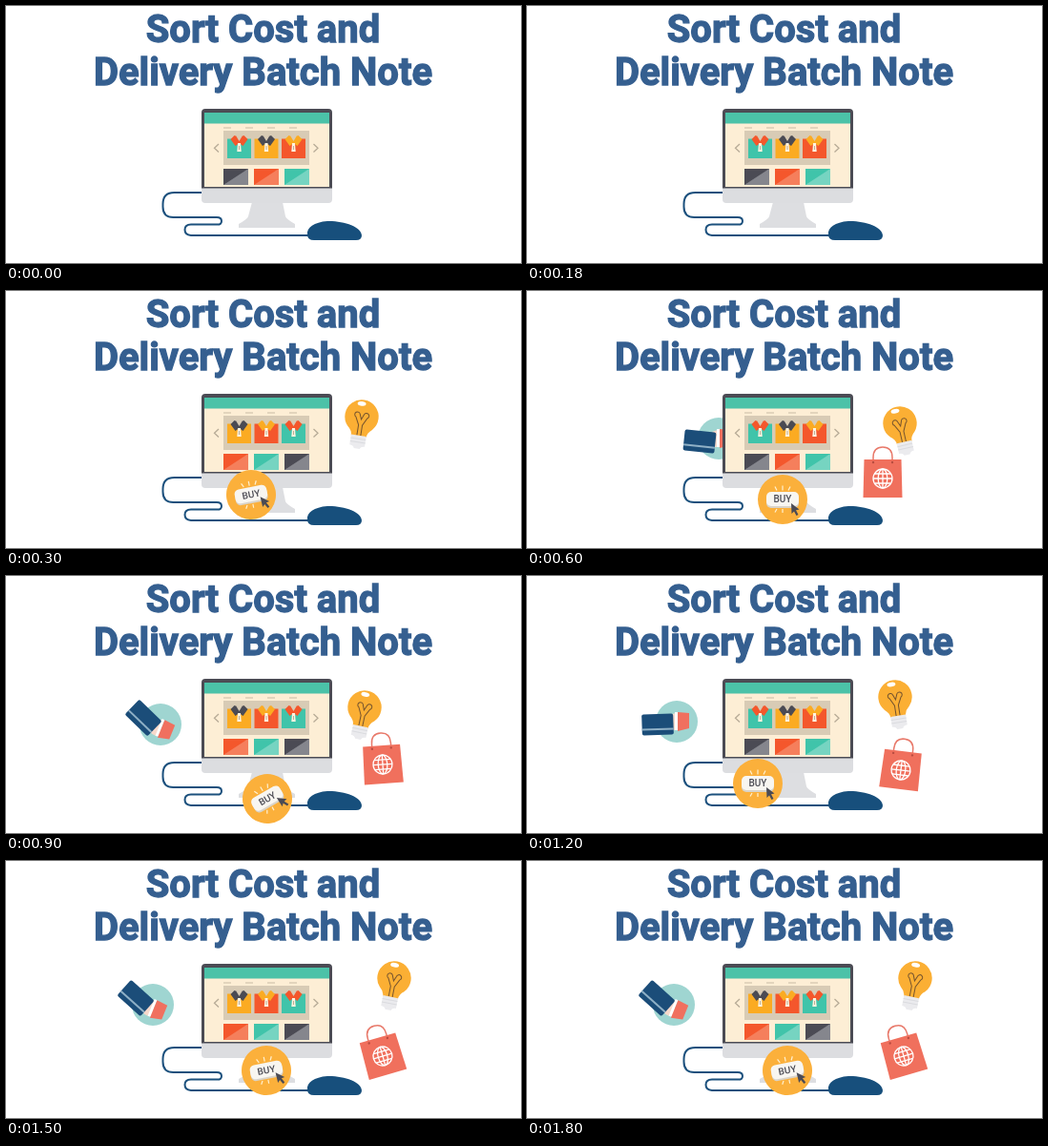
These frames come from a looping animation (540 px wide and 270 px high, 2000 ms). An HTML page:

```html
<!DOCTYPE html>
<html lang="en">
<head>
<meta charset="utf-8">
<title>Order animation</title>
<style>
html, body { margin: 0; width: 100%; height: 100%; overflow: hidden; background: #fff; }
svg { display: block; width: 540px; height: 270px; }
text { font-family: Roboto, Arial, sans-serif; text-anchor: middle; }
.title { font-weight: 700; font-size: 40px; fill: #355f90; stroke: #355f90; stroke-width: 1.3px; }
</style>
</head>
<body>
<svg viewBox="0 0 540 270">
  <text class="title" x="269.5" y="38">Sort Cost and</text>
  <text class="title" x="269.5" y="82.5">Delivery Batch Note</text>
  <g id="card"></g>
  <path d="M206 196H176.500Q164.500 196 164.500 208V211Q164.500 222 175.500 222H221Q226 222 226 226T221 229.500H194Q187.500 229.500 187.500 235T194 241H320"
    fill="none" stroke="#1b507d" stroke-width="2"/>
  <path d="M316 240C315 233 323 227 337 226C354 225.500 373 232 373 241Q373 246 367 246H323Q316 246 316 240Z" fill="#174f7c"/>
  <path d="M258 206H290L293 221Q294 224 303 229V233H244V229Q253 224 254 221Z" fill="#dddee1"/>
  <path d="M205 192V112Q205 108 209 108H338Q342 108 342 112V192Z" fill="#4b4b54"/>
  <path d="M205 191.500H342V203Q342 207 338 207H209Q205 207 205 203Z" fill="#dcdde0"/>
  <path d="M208 112H339V124H208Z" fill="#4bc2a8"/>
  <path d="M208 123.500H339V190H208Z" fill="#fdeed5"/>
  <path d="M228 128h8m15 0h8m15 0h8m15 0h8" stroke="#c9bda6" stroke-width="1.200"/>
  <path d="M228 131H318V167H228Z" fill="#d8cbb5"/>
  <path d="M223 145l-4.500 4.200 4.500 4.200M322.500 145l4.500 4.200-4.500 4.200" fill="none" stroke="#b7ab97" stroke-width="1.300"/>
  <g id="shop"></g>
  <g id="bag"></g>
  <g id="bulb"></g>
  <g id="buy"></g>
</svg>
<script>
const teal = '#40c4aa', red = '#f4572c', yellow = '#fbab22', dark = '#4b4b54';

// One [x, y, angle] per step; a missing entry hides the part.
const poses = {
  card: [, , [201, 155, 6], [162, 156, 44], [157, 153, -2], [154, 151, 42]],
  bag: [, , [373, 197, 0], [395, 198, -4], [392, 204, 7], [395, 205, -16]],
  bulb: [, [373, 132, 9], [391, 139, -13], [376, 138, 12], [386, 127, -9], [407, 123, 11]],
  buy: [, [257, 214, -11], [268, 219, 0], [274, 234, -30], [242, 218, 0], [273, 220, -11]]
};

const shape = (d, fill) => `<path d="${d}" fill="${fill}"/>`;
const line = (d, color, width = 1) =>
  `<path d="${d}" fill="none" stroke="${color}" stroke-width="${width}"/>`;
const disc = (r, fill) => `<circle r="${r}" fill="${fill}"/>`;
const place = (x, y, angle, body) =>
  `<g transform="translate(${x} ${y}) rotate(${angle})">${body}</g>`;

const draw = {
  card(x, y, angle) {
    const tilted = angle > 30;
    const hand = shape('M-8 -3Q-3 -9 3 -9L5 8Q-3 11 -8 5Z', '#f7d9cb')
      + shape('M1 -10H4V9H1Z', '#fff') + shape('M4 -10L16 -9V7L4 10Z', '#f0705f');
    const card = '<rect x="-16.500" y="-11" width="33" height="22" rx="2" fill="#1b4d79"/>'
      + shape('M-16.500 4H16.500V6H-16.500Z', '#8fb0c6');
    return place(x, y, 0, disc(22, '#9fd5d1')
      + place(-3, tilted ? 3 : 0, tilted ? 22 : 0, hand)
      + place(tilted ? -18 : -20, tilted ? -7 : 3, angle, card));
  },
  bag(x, y, angle) {
    return place(x, y, angle,
      line('M-10 -17V-22Q-10 -33 0 -33T10 -22V-17', '#e8796a', 1.5)
      + shape('M-19.500 -20H19.500L20.500 20H-20.500Z', '#f0705d')
      + '<g fill="#b84c40"><circle cx="-10" cy="-17" r="1.200"/><circle cx="10" cy="-17" r="1.200"/></g>'
      + '<g fill="none" stroke="#fff" stroke-width="1.300"><circle r="10"/><ellipse rx="4.800" ry="10"/>'
      + '<path d="M0 -10V10M-10 0H10M-8.500 -5H8.500M-8.500 5H8.500"/></g>');
  },
  bulb(x, y, angle) {
    return place(x, y, angle,
      shape('M-8 21Q-8 16 -13 12A17.700 17.700 0 1 1 13 12Q8 16 8 21Z', '#fbaf34')
      + '<ellipse cx="-2" cy="-13.500" rx="4.500" ry="2.300" fill="#fff"/>'
      + line('M-2 20V9L-6 1A2.800 2.800 0 1 1 -2 -2L0 3L2 -2A2.800 2.800 0 1 1 6 1L2 9V20', '#74532e')
      + shape('M-8 20H8V31Q4 31 3 34H-3Q-4 31 -8 31Z', '#ebebee')
      + line('M-8 23.500H8M-8 27H8', '#dadbdf'));
  },
  buy(x, y, angle) {
    return place(x, y, angle, disc(26, '#fbb03b')
      + line('M0 -9.500V-14.500M-6 -9.500L-8 -13.500M6 -9.500L8 -13.500M0 10V14M-6 10L-8 13.500', '#fff0d0', 1.2)
      + '<rect x="-17" y="-6" width="34" height="15" rx="5" fill="#d9d4ca"/>'
      + '<rect x="-17" y="-8" width="34" height="15" rx="5" fill="#f8f6f1"/>'
      + `<text y="3.300" font-size="10" font-weight="500" fill="${dark}">BUY</text>`
      + shape('M9 4L17.500 10.500L14 11.200L16.500 16L14.500 17L12 12.500L9.500 15Z', dark));
  }
};

function shop(step) {
  const shirts = [[teal, red], [yellow, dark], [red, yellow]];
  const tiles = [[dark, '#85868d'], [red, '#f57f5c'], [teal, '#76d4c1']];
  let out = '';
  for (let i = 0; i < 3; i++) {
    const k = (i + step % 2) % 3;
    const [cloth, collar] = shirts[k], [deep, pale] = tiles[k];
    out += place(244.5 + 28.5 * i, 0, 0,
      shape('M-12.500 139.500H12.500V160H-12.500Z', cloth)
      + shape('M-5 136L-9 140L-4 147L0 144L4 147L9 140L5 136L0 138Z', collar)
      + shape('M-3 137H3L0 142Z', '#d8cbb5')
      + shape('M-1.500 144H1.500L2.200 153H-2.200Z', '#fff3df')
      + line('M0 147V151', '#a99b83', .8));
    const x = 228 + 32 * i;
    out += shape(`M${x} 171H${x + 26}V188H${x}Z`, pale)
      + shape(`M${x} 171H${x + 26}L${x} 188Z`, deep);
  }
  return out;
}

const node = id => document.getElementById(id);
const start = performance.now();
let shown = -1;

function tick() {
  const time = (performance.now() - start) % 2000;
  const step = Math.min(5, Math.floor(time / 300));
  if (step !== shown) {
    shown = step;
    node('shop').innerHTML = shop(step);
    for (const id in poses) {
      const pose = poses[id][step];
      node(id).innerHTML = pose ? draw[id](...pose) : '';
    }
  }
  requestAnimationFrame(tick);
}
tick();
</script>
</body>
</html>
```
